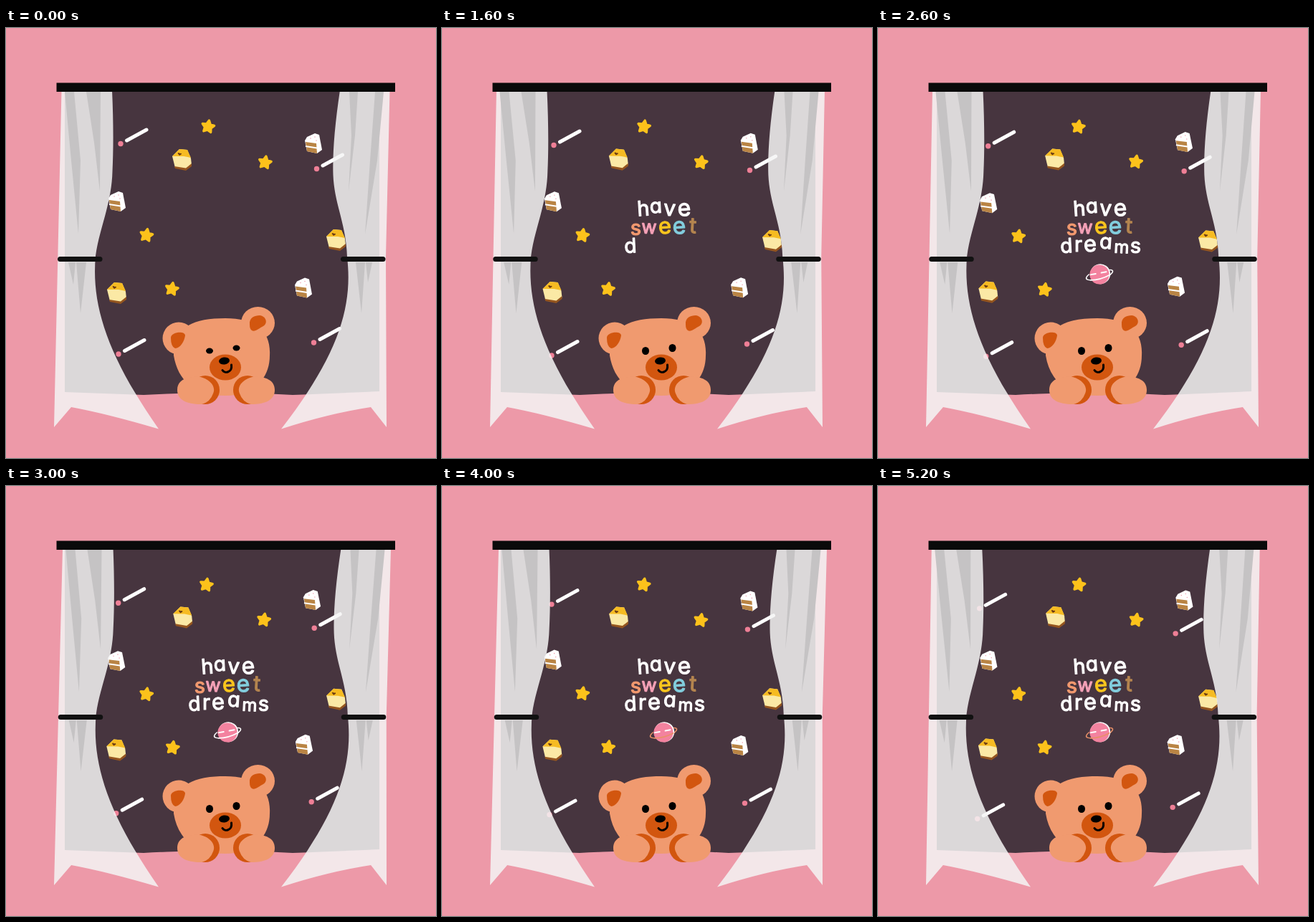
An HTML page that plays this animation: 600 by 600 pixels, repeating every 5300 ms.

```html
<!DOCTYPE html>
<html lang="en">
<head>
<meta charset="utf-8">
<title>Have sweet dreams</title>
<style>
  html, body { margin: 0; width: 100%; height: 100%; overflow: hidden; background: #ed99a8; }
  svg { display: block; width: 100vw; height: 100vh; }
  text { font-family: Inter, "Open Sans", sans-serif; font-weight: 400; font-feature-settings: "cv11";
         text-anchor: middle; stroke-width: 1.2; stroke-linejoin: round; }
  .cloth { fill: rgba(245, 245, 245, .85); }
  .fold { fill: #c5c3c4; }
  .tie { stroke: #111; stroke-width: 7; stroke-linecap: round; }
  .fur { fill: #f09a6f; }
  .dark { fill: #d2560f; }
</style>
</head>
<body>
<svg viewBox="0 0 600 600">
  <defs>
    <path id="star" d="M0-8.5L2.7-3.2 8.3-2.6 4.3 1.6 5 7.2 0 4.7-5 7.2-4.3 1.6-8.3-2.6-2.7-3.2Z"
          fill="#fcc21b" stroke="#fcc21b" stroke-width="3.4" stroke-linejoin="round" transform="rotate(10)"/>
    <g id="slice">
      <path d="M-12-4L-9-9 2-14 8-12 12 9 5 14-9 11Z" fill="#fff"/>
      <path d="M-11-2L4 0 5 14-9 11Z" fill="#b98444"/>
      <path d="M-11 4L5 6.5" stroke="#fff" stroke-width="2"/>
      <g fill="#f3a3b4"><circle cx="-4" cy="-7" r=".8"/><circle cx="2" cy="-9" r=".8"/><circle cx="4" cy="-4" r=".8"/></g>
    </g>
    <g id="cube">
      <path d="M-13-5L-3-15 8-14 13-2 14 7 6 14-9 11Z" fill="#fbe9a5"/>
      <path d="M-13-5L-3-15 8-14 13-3 3-5Z" fill="#f6bb22"/>
      <path d="M-10 9L6 11.500 14 5V9L6 15-9 12Z" fill="#94551f"/>
      <path d="M-3-6L-5.500-9Q-4-11-2.500-9 0-10 0-8Z" fill="#6b3a12"/>
    </g>
    <g id="comet">
      <circle r="3.7" fill="#ee7f96"/>
      <path d="M8.5-4.5L36-19.5" stroke="#fff" stroke-width="5" stroke-linecap="round"/>
    </g>
  </defs>

  <rect width="600" height="600" fill="#ed99a8"/>
  <path d="M82 85H521V507Q450 510 400 512 300 506 192 512L82 508Z" fill="#47353f"/>

  <g id="sky"></g>
  <g id="cubes"></g>
  <g id="comets"></g>

  <g id="words"></g>
  <g id="planet">
    <g transform="translate(309 344) rotate(-10)">
      <path class="ring" d="M-14-3C-25 3-17 7 0 6 19 5 24-4 14-4" fill="none" stroke-width="1.5"/>
      <circle cx="1.3" cy="-.6" r="14" fill="#fff"/>
      <circle r="13.6" fill="#f3829f"/>
      <path class="ring" d="M-14 5.5Q0 8 14 3" fill="none" stroke-width="1.5"/>
      <path d="M-12-2H-5M3-2H10" stroke="#fff" stroke-width="2" stroke-linecap="round"/>
    </g>
  </g>

  <g id="left">
    <path class="cloth" d="M77.500 87H148C150 130 150 170 148.500 200C147.500 245 130 280 125 318C119 385 140 455 213 559.500Q140 538 91 529L67 557Z"/>
    <path class="fold" d="M82 89H95L104 185 101 287 91 185ZM112 89H132L131 228 123 160ZM87 327H97L94 358ZM98 327H112L104 398Z"/>
    <path class="tie" d="M75.500 322.500H131"/>
  </g>
  <g id="right">
    <path class="cloth" d="M466 87H535.500L530 320 531 557 509 529Q450 538 384 559.500C465 455 484 388 476 320C475 275 458 245 456.500 205Q455 160 466 87Z"/>
    <path class="fold" d="M479 89H491L487 150 478 228 482 150ZM515 89H527L518 185 501 288 508 185ZM488 327H501L496 398ZM502 327H511L505 355Z"/>
    <path class="tie" d="M470.500 322.500H526"/>
  </g>
  <rect x="70.500" y="76.500" width="472.500" height="12.500" fill="#0a0a0a"/>

  <g id="bear">
    <circle class="fur" cx="241" cy="433" r="22.500"/>
    <ellipse class="fur" cx="351.500" cy="411.500" rx="23.500" ry="22.500"/>
    <path class="fur" d="M234 457C234 416 262 405 306 405C348 405 370 422 368 457C368 492 342 513 306 513C264 513 240 493 234 457Z"/>
    <path class="dark" d="M230 432C230 424 250 422 250 429C249 437 243 447 236 447Q230 445 230 432Z"/>
    <path class="dark" d="M340 414C339 404 347 401 354 401C363 402 366 412 359 416C353 419 347 425 343 422Q340 420 340 414Z"/>
    <ellipse class="dark" cx="278" cy="505" rx="20" ry="20"/>
    <path class="fur" d="M239 505C239 491 252 487 268 486C287 490 293 502 289 510Q285 522 273 525C250 525 239 518 239 505Z"/>
    <ellipse class="dark" cx="337" cy="505" rx="20" ry="20"/>
    <path class="fur" d="M375 505C375 491 362 487 347 486C328 490 322 502 326 510Q330 522 342 525C364 525 375 518 375 505Z"/>
    <ellipse class="dark" cx="306" cy="473.500" rx="22" ry="18"/>
    <ellipse cx="304.500" cy="464.500" rx="7.500" ry="5" transform="rotate(-8 304.500 464.500)"/>
    <path d="M302 477.500C305 482.500 316 481 314.500 470" fill="none" stroke="#000" stroke-width="3" stroke-linecap="round"/>
    <ellipse class="eye" cx="284" cy="450.500" rx="5" ry="5.500"/>
    <ellipse class="eye" cx="321.500" cy="446.500" rx="5" ry="5.500"/>
  </g>
</svg>
<script>
const LOOP = 5300, STEP = 100;
const $ = id => document.getElementById(id);

function make(parent, tag, attrs, text = '') {
  const el = document.createElementNS('http://www.w3.org/2000/svg', tag);
  for (const key in attrs) el.setAttribute(key, attrs[key]);
  el.textContent = text;
  parent.append(el);
  return el;
}
const place = (parent, id, spots) =>
  spots.forEach(([x, y]) => make(parent, 'use', { href: '#' + id, transform: `translate(${x} ${y})` }));

place($('sky'), 'star', [[282, 137.5], [361.5, 187.5], [196, 289], [231.5, 364]]);
place($('sky'), 'slice', [[429, 161], [155, 242], [415, 362.5]]);
place($('cubes'), 'cube', [[245, 184], [460, 296], [154, 370]]);
place($('comets'), 'comet', [[160, 161.5], [433.5, 196.5], [157, 455], [429.5, 439]]);

// letter, centre, baseline, size, tilt, colour
const W = '#fff';
const letters = [
  ['h', 281, 262, 29, -4, W], ['a', 298.5, 258, 28, -3, W], ['v', 317.5, 262, 30, 3, W], ['e', 338, 262, 32, -4, W],
  ['s', 270.5, 289, 29, 0, '#f2996f'], ['w', 289, 287, 26, 2, '#f4a0b6'], ['e', 311, 287, 31, -4, '#f9c51e'],
  ['e', 331, 287, 32, -4, '#82cddd'], ['t', 350, 286, 30, 3, '#b5854f'],
  ['d', 263, 313.5, 28, -3, W], ['r', 279.5, 312, 29, 0, W], ['e', 296, 312, 31, -4, W],
  ['a', 318, 308, 29, 4, W], ['m', 340, 314, 24, 3, W], ['s', 359.5, 314, 29, 0, W]
].map(([ch, x, y, size, tilt, color]) => make($('words'), 'text', {
  x, y, 'font-size': size, fill: color, stroke: color, transform: `rotate(${tilt} ${x} ${y - 8})`
}, ch));

// linear interpolation through [time, value] pairs
function track(keys, t) {
  const i = keys.findIndex(k => k[0] > t);
  if (i < 0) return keys[keys.length - 1][1];
  if (i === 0) return keys[0][1];
  const [t0, a] = keys[i - 1], [t1, b] = keys[i];
  return a + (b - a) * (t - t0) / (t1 - t0);
}
const skyTurn = [[0, 0], [1600, -.1], [2200, -.9], [3000, -.85], [4000, -.25], [5200, -.65]];
const cubeTurn = [[0, 0], [800, .05], [1600, .4], [3000, .6], [4000, .5], [5200, 1]];
const glide = [[0, 0], [870, 20.5], [1100, 8], [1430, 0]];

const turn = (id, deg) => $(id).setAttribute('transform', `rotate(${deg} 300 300)`);
const show = (el, on) => el.setAttribute('visibility', on ? 'visible' : 'hidden');

function draw(t) {
  const lean = 3.5 * Math.sin(t / 2800 * 2 * Math.PI) / 471;
  for (const id of ['left', 'right'])
    $(id).setAttribute('transform', `matrix(1 0 ${-lean} 1 ${lean * 559} 0)`);

  turn('sky', track(skyTurn, t));
  turn('cubes', track(cubeTurn, t));
  const d = track(glide, t % 1430);
  $('comets').setAttribute('transform', `translate(${-d} ${d * .51})`);

  letters.forEach((el, i) => show(el, t >= 100 + i * 165));
  show($('planet'), t >= 2600);
  document.querySelectorAll('.ring').forEach(el => el.setAttribute('stroke', t < 3500 ? '#fff' : '#e89068'));
  document.querySelectorAll('.eye').forEach(el => el.setAttribute('ry', t < STEP ? 4 : 5.5));
}

const start = performance.now();
function tick() {
  const t = (performance.now() - start) % LOOP;
  draw(Math.floor(t / STEP) * STEP);
  requestAnimationFrame(tick);
}
tick();
</script>
</body>
</html>
```
